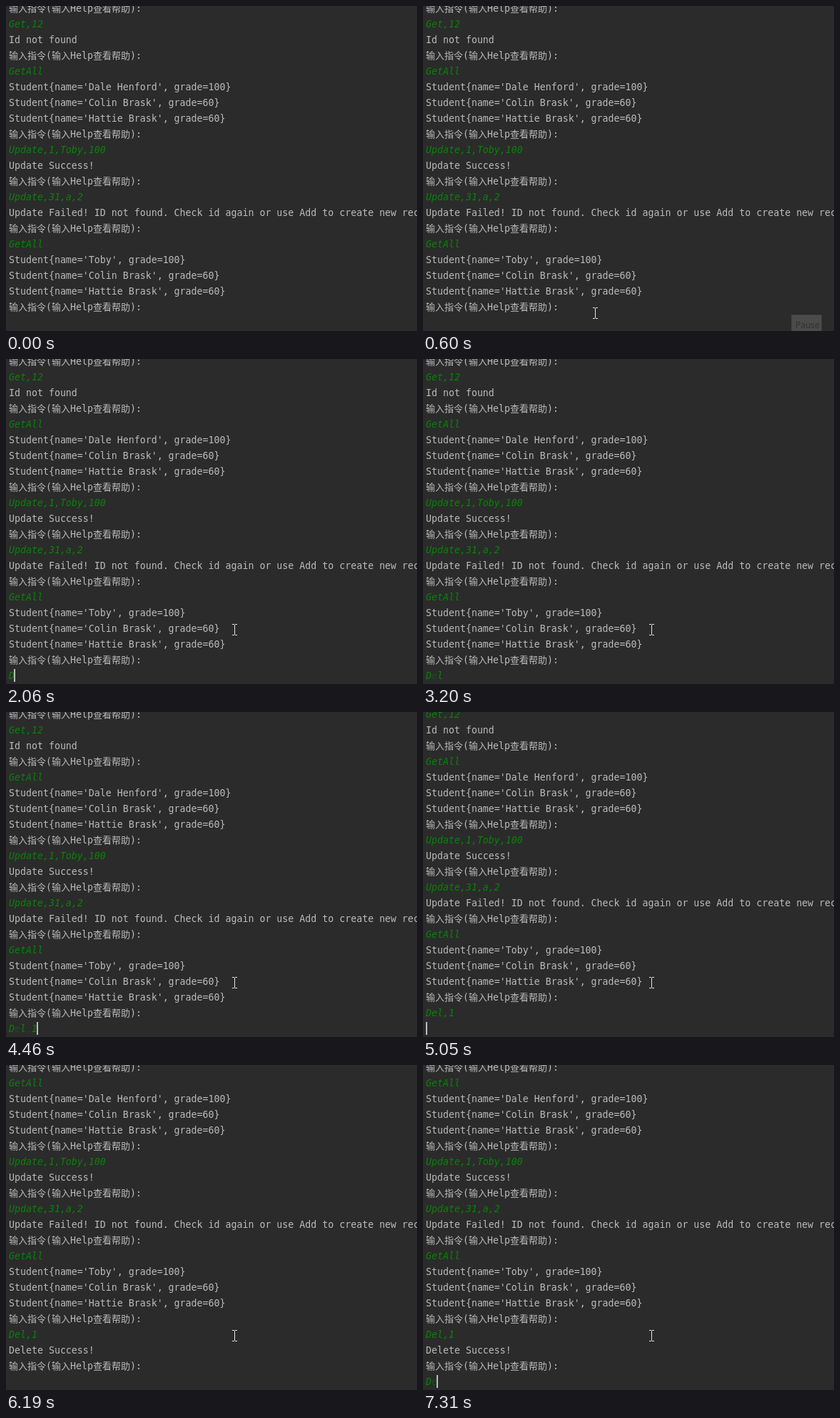
An HTML page for the animation above (8 s loop, 576 by 455 pixels).

```html
<!DOCTYPE html>
<html lang="zh">
<head>
<meta charset="utf-8">
<style>
  html, body { margin: 0; width: 100%; height: 100%; overflow: hidden; background: #2b2b2b; }
  svg { display: block; }
  .mono { font: 13.288px "DejaVu Sans Mono", monospace; white-space: pre; fill: #bbb; }
  .in { font-style: italic; fill: #078407; }
  .dim { fill: #15511a; }
  .han { font: 13px "Noto Sans CJK SC", "Noto Sans CJK", sans-serif; }
  .tip { font: 12px "Open Sans", sans-serif; fill: #454545; }
</style>
</head>
<body>
<svg width="576" height="455" viewBox="0 0 576 455">
  <g id="log"></g>
  <text id="typed" class="mono in" x="4" y="448"></text>
  <rect id="caret" y="434" width="2" height="18" fill="#bbb"/>
  <g id="tip">
    <rect x="516.5" y="432.5" width="42" height="24" fill="#fff" stroke="#bbb"/>
    <text class="tip" x="522" y="451">Pause</text>
  </g>
  <path id="mouse" d="M-3 -7.5H0M1 -7.5H4M.5 -7V7M-3 7.5H0M1 7.5H4" fill="none" stroke="#e4e4e4"/>
</svg>
<script>
const LOOP = 8000, TICK = 1000 / 15, ROW = 22, BOTTOM = 20;
const PROMPT = '?';
const student = (name, grade) => `Student{name='${name}', grade=${grade}}`;
const rest = [student('Colin Brask', 60), student('Hattie Brask', 60), PROMPT];

// A leading ">" marks user input.
const lines = [
  PROMPT, '>Get,12', 'Id not found',
  PROMPT, '>GetAll', student('Dale Henford', 100), ...rest,
  '>Update,1,Toby,100', 'Update Success!',
  PROMPT, '>Update,31,a,2',
  'Update Failed! ID not found. Check id again or use Add to create new record.',
  PROMPT, '>GetAll', student('Toby', 100), ...rest,
  '>Del,1', 'Delete Success!', PROMPT
];

// time, scrolled rows, typed text, caret shown
const steps = [
  [0, 0, '', 0], [1200, 0, '', 1], [2060, 0, 'D', 1], [2390, 0, 'De', 1],
  [2600, 0, 'Del', 1], [3200, 0, 'Del', 0], [3590, 0, 'Del,', 1],
  [4190, 0, 'Del,', 0], [4460, 0, 'Del,1', 1], [5050, 1, '', 1],
  [5250, 3, '', 1], [6190, 3, '', 0], [6650, 3, '', 1],
  [6850, 3, 'D', 1], [7310, 3, 'De', 1]
];

// time, x, y
const path = [
  [460, 440, 452], [530, 325, 440], [600, 241, 430], [670, 208, 426],
  [870, 186, 432], [1260, 175, 439], [1330, 190, 431], [1400, 232, 410],
  [1460, 275, 393], [1530, 306, 383], [1600, 320, 379]
];
const fade = [[460, .42], [530, .28], [600, .15], [740, 0]];

const $ = id => document.getElementById(id);
const span = (cls, text) => `<tspan class="${cls}">${text}</tspan>`;
const promptText = `${span('han', '输入指令')}(${span('han', '输入')}Help${span('han', '查看帮助')}):`;

function markup(line) {
  if (line === PROMPT) return promptText;
  return line[0] === '>' ? span('in', line.slice(1)) : line;
}

$('log').innerHTML = lines.map((line, i) =>
  `<text class="mono" x="4" y="${8 + ROW * i}">${markup(line)}</text>`).join('');
const rows = [...$('log').children];

// Linear interpolation of every value column in a keyed table.
function sample(table, t) {
  const i = table.findIndex(k => k[0] > t);
  if (i < 0) return table[table.length - 1].slice(1);
  if (i === 0) return table[0].slice(1);
  const a = table[i - 1], b = table[i], p = (t - a[0]) / (b[0] - a[0]);
  return a.slice(1).map((v, n) => v + (b[n + 1] - v) * p);
}

let shown;
function showStep(step) {
  if (step === shown) return;
  shown = step;
  const [, scroll, text, caret] = step;
  $('log').setAttribute('transform', `translate(0 ${-ROW * scroll})`);
  rows.forEach((row, i) => row.setAttribute('visibility', i < BOTTOM + scroll ? 'visible' : 'hidden'));
  $('typed').innerHTML = [...text].map((c, i) => span(i % 2 ? 'in dim' : 'in', c)).join('');
  $('caret').setAttribute('x', Math.max(4, 3 + 8 * text.length));
  $('caret').setAttribute('opacity', caret);
}

function draw(now) {
  const t = now % LOOP;
  showStep(steps.findLast(s => s[0] <= t));
  const q = Math.floor((t + 7) / TICK) * TICK;
  const on = t >= 460;
  const [x, y] = sample(path, q).map(Math.round);
  $('mouse').setAttribute('transform', `translate(${x} ${y})`);
  $('mouse').setAttribute('opacity', on ? 1 : 0);
  $('tip').setAttribute('opacity', on ? sample(fade, q)[0] : 0);
}

const start = performance.now();
function loop() {
  draw(performance.now() - start);
  requestAnimationFrame(loop);
}
loop();
</script>
</body>
</html>
```
